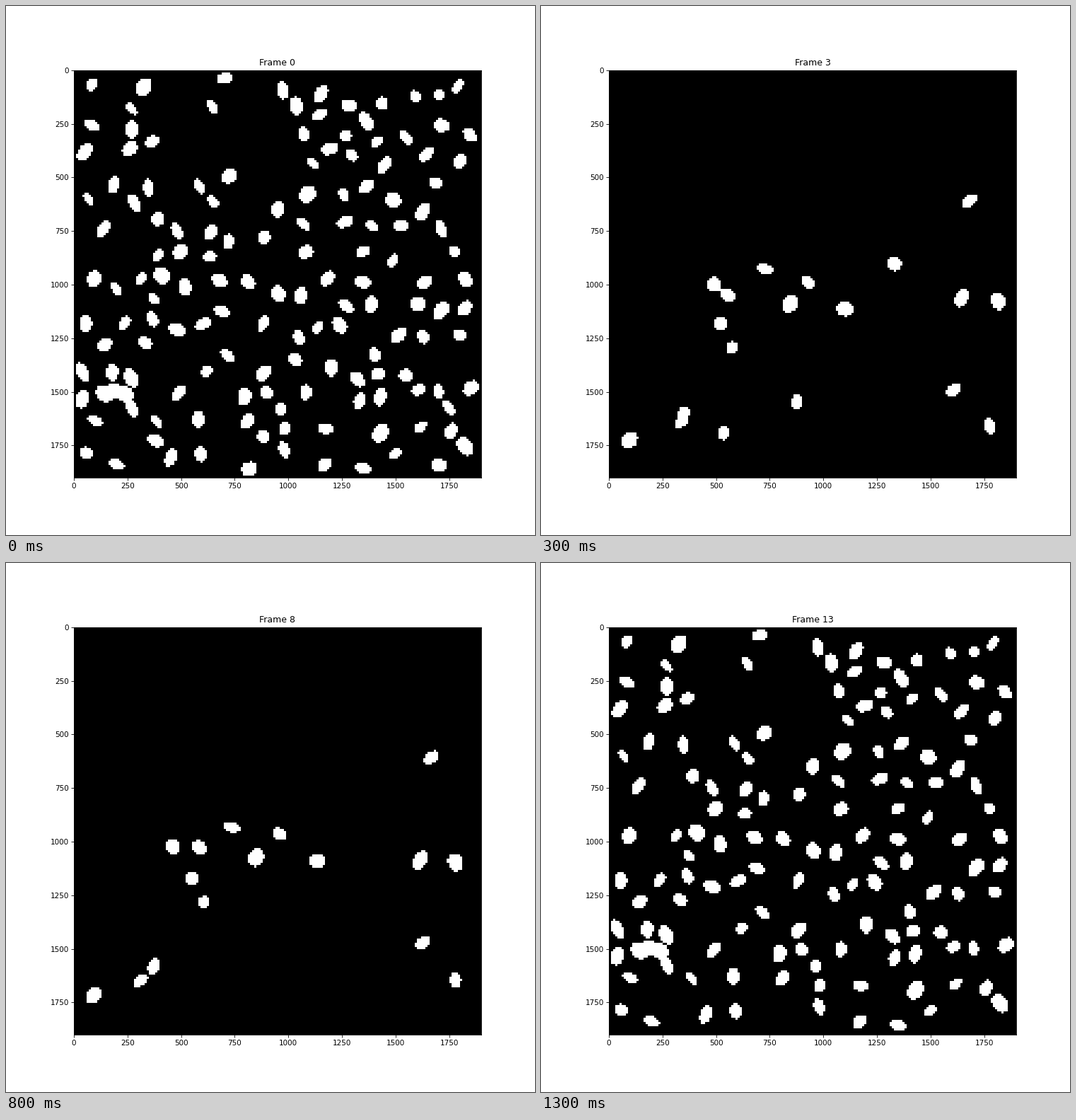
A matplotlib script for the animation above (1400 ms loop, 748 by 748 pixels).

```python
import numpy as np
import matplotlib.pyplot as plt
from matplotlib.animation import FuncAnimation

SIZE, BLOCK = 1900, 10
FRAMES = 14
CELLS, SPACING = 146, 88
LEAVE_RATE = 0.06
PASSERS = 9

# Where the long-lived cells sway
HOMES = [(1678, 598), (730, 938), (475, 1012), (570, 1038), (534, 1183), (588, 1296),
         (850, 1073), (1120, 1103), (1630, 1075), (1797, 1082), (362, 1590), (327, 1635),
         (99, 1712), (1780, 1645), (945, 975), (1620, 1475)]
CLUMP = (190, 1495)
VOIDS = [(870, 330), (500, 250)]
VOID_RADII = (130, 330)

rng = np.random.default_rng(7)
centres = (np.arange(SIZE // BLOCK) + 0.5) * BLOCK
X, Y = np.meshgrid(centres, centres)


def random_outline():
    """Width, height and tilt of one cell."""
    return rng.uniform(50, 80), rng.uniform(52, 88), rng.uniform(-0.5, 0.5)


def stamp(mask, x, y, w, h, tilt):
    """Fill a slanted ellipse whose bounding box is w by h."""
    u, v = (X - x) / (w / 2), (Y - y) / (h / 2)
    mask[u * u - 2 * tilt * u * v + v * v <= 1 - tilt * tilt] = 1


def in_void(x, y):
    rx, ry = VOID_RADII
    return any(np.hypot((x - vx) / rx, (y - vy) / ry) < 1 for vx, vy in VOIDS)


def scatter():
    """Random points that keep their distance and avoid the voids."""
    points = [CLUMP]
    while len(points) < CELLS:
        x, y = rng.uniform(30, SIZE - 40, 2)
        if not in_void(x, y) and all(np.hypot(x - px, y - py) > SPACING for px, py in points):
            points.append((x, y))
    return points


residents = [(x, y, *random_outline()) for x, y in scatter()]
clump = [(CLUMP[0] + dx, CLUMP[1] + abs(dx) / 4, 85, 80, 0.2) for dx in (-45, 0, 45)]
staying = rng.random(CELLS) > LEAVE_RATE

sways = [(home, random_outline(), rng.uniform(0, 2 * np.pi)) for home in HOMES]
passers = [(rng.uniform(350, 1800), rng.uniform(400, 1850), *random_outline())
           for _ in range(PASSERS)]
departures = rng.choice((2, 2, 2, 4), PASSERS)


def crowd(present):
    mask = np.zeros_like(X)
    for cell in clump + [c for c, here in zip(residents, present) if here]:
        stamp(mask, *cell)
    return mask


def tracked(t):
    mask = np.zeros_like(X)
    for (x, y), outline, phase in sways:
        stamp(mask, x + 18 * np.sin(0.7 * t + phase), y + 15 * np.cos(0.9 * t + phase), *outline)
    for cell, last in zip(passers, departures):
        if t <= last:
            stamp(mask, *cell)
    return mask


def field(t):
    if t == 0:
        return crowd(np.ones(CELLS, bool))
    if t == FRAMES - 1:
        return crowd(staying)
    return tracked(t)


fig, ax = plt.subplots(figsize=(10, 10), dpi=74.8)
fig.subplots_adjust(left=0.1258, right=0.9008, bottom=0.1088, top=0.8788)
edge = SIZE - 0.5
image = ax.imshow(field(0), cmap="gray", vmin=0, vmax=1, interpolation="nearest",
                  extent=(-0.5, edge, edge, -0.5))
title = ax.set_title("Frame 0")


def update(t):
    image.set_data(field(t))
    title.set_text(f"Frame {t}")
    return image, title


anim = FuncAnimation(fig, update, frames=FRAMES, interval=100, repeat=True, repeat_delay=0)
plt.show()
```
